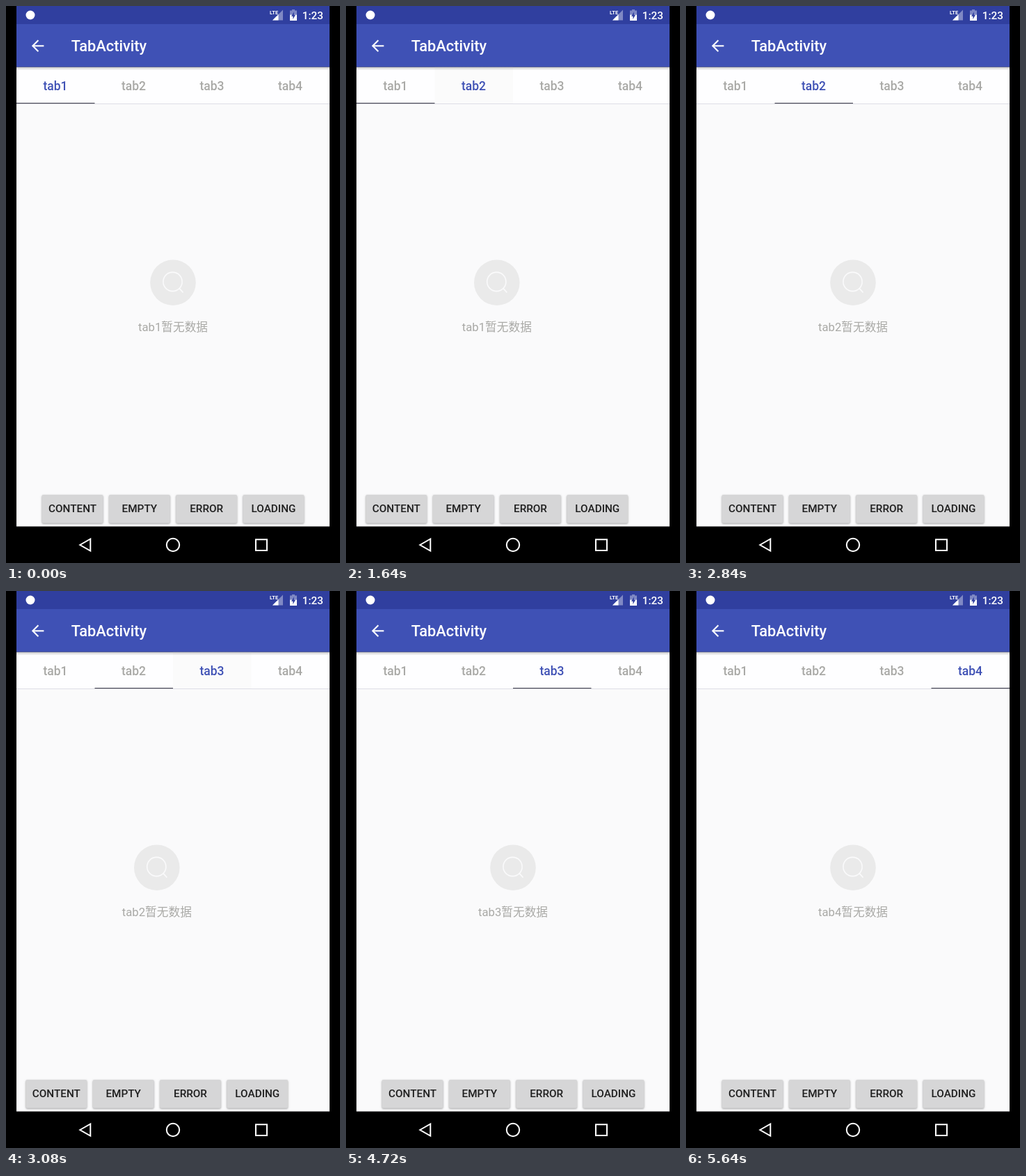
Write an HTML page with a canvas that moves like this. It is 480 px wide and 800 px high and loops after 6.28 s.

```html
<!DOCTYPE html>
<html lang="zh-CN">
<head>
<meta charset="utf-8">
<title>Tabs</title>
<style>
  html, body { margin: 0; width: 100%; height: 100%; overflow: hidden; background: #000; }
  canvas { display: block; width: 480px; height: 800px; }
</style>
</head>
<body>
<canvas id="stage" width="480" height="800"></canvas>
<script>
const ctx = document.getElementById('stage').getContext('2d');
const FONT = 'Roboto, "Noto Sans CJK SC", "Noto Sans CJK", sans-serif';
const LOOP = 6280, LEFT = 15, WIDTH = 450, TAB = WIDTH / 4;
const STEP = 112, GRID = 40;                       // screen refresh, clock grid
const PAGE_MS = 228, BAR_MS = 300, BAR_DELAY = 85;
const STATUS = '#303f9f', PRIMARY = '#3f51b5', DIM = '#7f88c4';
const PAGE = '#fafafb', GREY = '#a9a9a6';

// Taps that move on to the next tab; lead is the time the page is already moving
const TAPS = [{ at: 1650, lead: 2.4 }, { at: 3090, lead: 2.4 }, { at: 5080, lead: 15 }];

const clamp = v => Math.max(0, Math.min(1, v));
const quint = u => 1 - Math.pow(1 - u, 5);

// Cubic bezier (0.4, 0, 0.2, 1)
function smooth(x) {
  let lo = 0, hi = 1;
  for (let i = 0; i < 24; i++) {
    const s = (lo + hi) / 2, r = 1 - s;
    if (1.2 * r * r * s + 0.6 * r * s * s + s * s * s < x) lo = s; else hi = s;
  }
  return 3 * (1 - lo) * lo * lo + lo * lo * lo;
}

// Time since a tap, advancing in whole refreshes
function elapsed(t, at) {
  const edge = GRID * (Math.floor(t / GRID) + 1);
  return STEP * (Math.ceil((edge - at) / STEP) - 1);
}

// Touch highlight: swells around the tap, then fades
const glow = e => clamp(e / 448 + 0.5) ** 2 * clamp((560 - e) / 224);

function rect(x, y, w, h, color) {
  ctx.fillStyle = color;
  ctx.fillRect(x, y, w, h);
}

function disc(x, y, r, color) {
  ctx.fillStyle = color;
  ctx.beginPath();
  ctx.arc(x, y, r, 0, Math.PI * 2);
  ctx.fill();
}

function trace(points, closed) {
  ctx.beginPath();
  points.forEach(([x, y]) => ctx.lineTo(x, y));
  if (closed) ctx.closePath();
}

function poly(points, color) {
  trace(points, true);
  ctx.fillStyle = color;
  ctx.fill();
}

function line(points, color, width, closed) {
  trace(points, closed);
  ctx.strokeStyle = color;
  ctx.lineWidth = width;
  ctx.stroke();
}

function ring(x, y, r, color, width) {
  ctx.beginPath();
  ctx.arc(x, y, r, 0, Math.PI * 2);
  ctx.strokeStyle = color;
  ctx.lineWidth = width;
  ctx.stroke();
}

function text(str, x, y, size, color, weight = 500, align = 'center') {
  ctx.font = `${weight} ${size}px ${FONT}`;
  ctx.textAlign = align;
  ctx.fillStyle = color;
  ctx.fillText(str, x, y);
}

function statusBar() {
  rect(LEFT, 0, WIDTH, 26.25, STATUS);
  disc(35, 13, 6.5, '#fff');
  text('LTE', 379, 12, 7.5, '#fff', 700, 'left');
  poly([[383, 20.5], [398, 5.5], [398, 20.5]], DIM);
  poly([[383, 20.5], [391.5, 12], [391.5, 20.5]], '#fff');
  rect(411, 5, 4, 2, DIM);
  rect(408, 6.5, 10, 6, DIM);
  rect(408, 12.5, 10, 8.5, '#fff');
  poly([[413.8, 8.5], [410, 14.7], [412.4, 14.7], [412.4, 19], [416, 12.8], [413.8, 12.8]], STATUS);
  text('1:23', 456, 19, 15.3, '#fff', 500, 'right');
}

function appBar() {
  rect(LEFT, 26, WIDTH, 61.5, PRIMARY);
  line([[54.4, 57.3], [38.5, 57.3]], '#fff', 2.1);
  line([[46.4, 49.3], [38.4, 57.3], [46.4, 65.3]], '#fff', 2.1);
  text('TabActivity', 93.7, 65.4, 21.8, '#fff', 500, 'left');
}

function tabs(t, selected, bar) {
  rect(LEFT, 87.5, WIDTH, 52.5, '#fefeff');
  for (let i = 0; i < 4; i++) {
    const x = LEFT + i * TAB;
    if (i) {
      ctx.globalAlpha = glow(elapsed(t, TAPS[i - 1].at));
      rect(x, 87.5, TAB, 52.5, '#f0f0f0');
      ctx.globalAlpha = 1;
    }
    text('tab' + (i + 1), x + TAB / 2 - 0.3, 121, 17.5, i === selected ? PRIMARY : GREY);
  }
  const shade = ctx.createLinearGradient(0, 87.5, 0, 92.5);
  shade.addColorStop(0, 'rgba(0,0,0,.22)');
  shade.addColorStop(1, 'rgba(0,0,0,0)');
  rect(LEFT, 87.5, WIDTH, 5, shade);
  rect(LEFT, 140, WIDTH, 1, '#dedee6');
  rect(LEFT + bar * TAB, 139, TAB, 1.2, '#4a4a58');
}

function button(label, x) {
  ctx.save();
  ctx.shadowColor = 'rgba(0,0,0,.35)';
  ctx.shadowBlur = 2.5;
  ctx.shadowOffsetY = 1;
  ctx.fillStyle = '#d6d6d7';
  ctx.beginPath();
  ctx.roundRect(x - 43.9, 702, 87.8, 40.8, 2);
  ctx.fill();
  ctx.restore();
  text(label, x, 727.3, 15.3, '#1f1f1f');
}

function page(index, dx) {
  const x = 240 + dx;
  disc(x, 397.3, 32.8, '#eaeaea');
  ring(x - 0.5, 396, 13.6, PAGE, 1.6);
  line([[x + 9.2, 405.7], [x + 14.5, 411.5]], PAGE, 1.8);
  text(`tab${index + 1}暂无数据`, x, 467, 16.7, GREY, 400);
  ['CONTENT', 'EMPTY', 'ERROR', 'LOADING'].forEach((label, i) =>
    button(label, x + (i - 1.5) * 96.3));
}

function navBar() {
  line([[106.3, 774], [121.3, 765.5], [121.3, 782.5]], '#fff', 2, true);
  ring(240, 774, 9.2, '#fff', 2);
  line([[359, 766.3], [375, 766.3], [375, 782], [359, 782]], '#fff', 2, true);
}

function draw(t) {
  let pos = 0, bar = 0, selected = 0;
  for (const { at, lead } of TAPS) {
    const e = elapsed(t, at);
    if (e < 0) break;
    pos += quint(clamp((e + lead) / PAGE_MS));
    bar += smooth(clamp((e - BAR_DELAY) / BAR_MS));
    selected++;
  }

  rect(0, 0, 480, 800, '#000');
  rect(LEFT, 140, WIDTH, 607.5, PAGE);
  ctx.save();
  ctx.beginPath();
  ctx.rect(LEFT, 140, WIDTH, 607.5);
  ctx.clip();
  for (let i = 0; i < 4; i++) {
    const dx = (i - pos) * WIDTH;
    if (Math.abs(dx) < WIDTH) page(i, dx);
  }
  ctx.restore();
  tabs(t, selected, bar);
  statusBar();
  appBar();
  navBar();
}

const origin = performance.now();
function frame() {
  draw((performance.now() - origin) % LOOP);
  requestAnimationFrame(frame);
}
frame();
</script>
</body>
</html>
```
